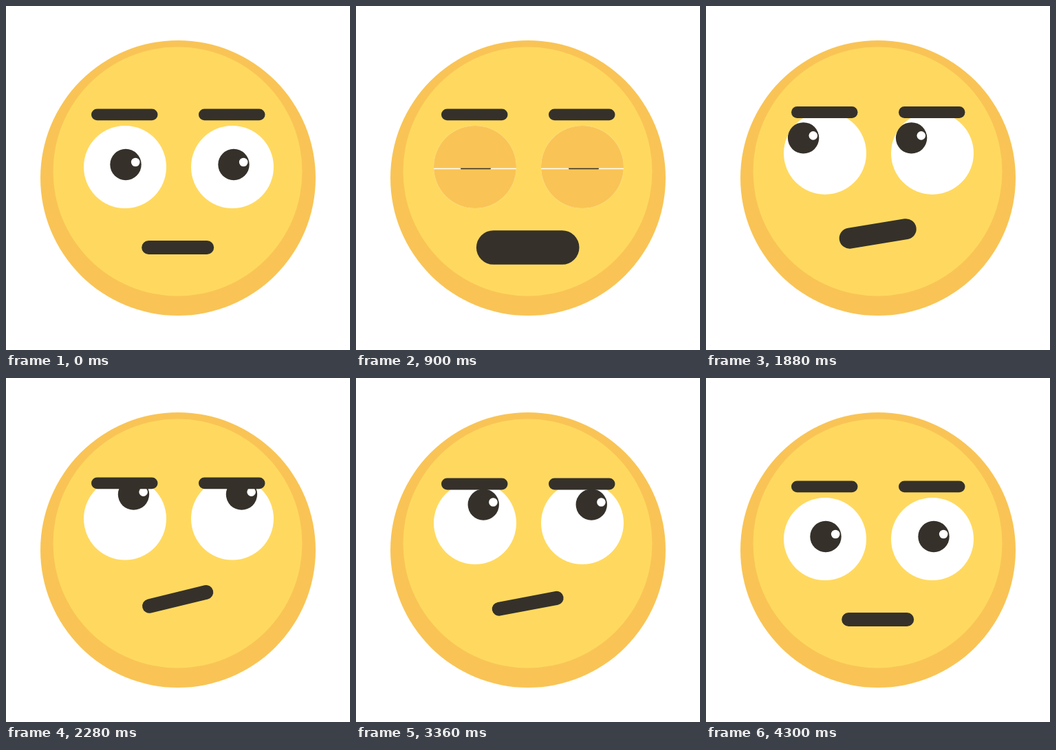
An HTML page that plays this animation: 500 by 500 pixels, repeating every 4.32 s.

```html
<!DOCTYPE html>
<html lang="en">
<head>
<meta charset="utf-8">
<title>Eye roll</title>
<style>
  html, body { margin: 0; width: 100%; height: 100%; overflow: hidden; background: #fff; }
  svg { display: block; width: 100vw; height: 100vh; }
  .rim { fill: #f9c455; }
  .skin { fill: #ffd95f; }
  .dark { fill: #35312a; }
  .white { fill: #fff; }
</style>
</head>
<body>
<svg viewBox="0 0 500 500">
  <defs>
    <clipPath id="ball"><circle cx="173" cy="234" r="60"/></clipPath>
    <clipPath id="underBrow"><rect x="90" y="153" width="320" height="200"/></clipPath>
    <g id="eye">
      <circle class="white" cx="173" cy="234" r="60"/>
    </g>
    <g id="pupil">
      <circle class="dark" cx="174" cy="230.5" r="22.7"/>
      <circle class="white" cx="188.2" cy="227" r="6.3"/>
    </g>
    <g id="lids" class="rim" clip-path="url(#ball)">
      <rect id="upper" x="105" y="170" width="136" height="0"/>
      <rect id="lower" x="105" y="298" width="136" height="0"/>
    </g>
    <rect id="brow" class="dark" x="124" y="149.5" width="96.5" height="16.8" rx="8.4"/>
  </defs>
  <circle class="rim" cx="250" cy="250" r="200"/>
  <circle class="skin" cx="249.5" cy="240.5" r="181"/>
  <g clip-path="url(#underBrow)">
    <g id="eyes">
      <use href="#eye"/>
      <use href="#eye" x="156"/>
      <g id="pupils">
        <use href="#pupil"/>
        <use href="#pupil" x="157"/>
      </g>
      <use href="#lids"/>
      <use href="#lids" x="156"/>
    </g>
  </g>
  <g id="brows">
    <use href="#brow"/>
    <use href="#brow" x="156"/>
  </g>
  <rect id="mouth" class="dark"/>
</svg>
<script>
const LOOP = 4320;
const $ = id => document.getElementById(id);
const [eyes, pupils, brows, mouth, upper, lower] =
  ['eyes', 'pupils', 'brows', 'mouth', 'upper', 'lower'].map($);

// Cubic bezier (.68, 0, .18, 1), solved by bisection.
function ease(x) {
  if (x <= 0) return 0;
  if (x >= 1) return 1;
  let lo = 0, hi = 1;
  for (let i = 0; i < 24; i++) {
    const s = (lo + hi) / 2, r = 1 - s;
    if (2.04 * s * r * r + 0.54 * s * s * r + s ** 3 < x) lo = s; else hi = s;
  }
  return lo * lo * (3 - 2 * lo);
}

// Eased value through [time, value] steps.
function track(t, steps) {
  let [t0, v0] = steps[0];
  for (const [t1, v1] of steps) {
    if (t < t1) return v0 + (v1 - v0) * ease((t - t0) / (t1 - t0));
    [t0, v0] = [t1, v1];
  }
  return v0;
}

const lift = [[0, 0], [1236, 0], [2540, 1], [2800, 1], [LOOP, 0]];
const blink = [[0, 0], [855, 1], [1236, 0]];
const thickness = [[0, 20], [1030, 50], [1236, 50], [2540, 20]];
const width = [[0, 105], [1030, 150], [1236, 150], [2346, 105.5], [2800, 105.5], [LOOP, 105]];

// Path of the gaze while the eyes roll: time, x, y.
const LOOK = [14.7, -30.5];
const roll = [
  [1080, 0, 0], [1340, -8, 5.5], [1510, -26, 8.5], [1690, -41, -1],
  [1880, -32.5, -18.5], [2020, -11, -29], [2180, 7.5, -32], [2540, ...LOOK]
];

// Smooth curve through the roll points, at rest at both ends.
function rollAt(t, axis) {
  let i = 0;
  while (i < roll.length - 2 && t >= roll[i + 1][0]) i++;
  const a = roll[i], b = roll[i + 1], span = b[0] - a[0];
  const slope = k => k === 0 || k === roll.length - 1 ? 0 :
    (roll[k + 1][axis] - roll[k - 1][axis]) / (roll[k + 1][0] - roll[k - 1][0]);
  const u = (t - a[0]) / span, r = 1 - u;
  return a[axis] * (1 + 2 * u) * r * r + b[axis] * u * u * (3 - 2 * u)
    + span * u * r * (slope(i) * r - slope(i + 1) * u);
}

function gaze(t, up) {
  if (t <= 1080) return [0, 0];
  if (t < 2540) return [rollAt(t, 1), rollAt(t, 2)];
  return LOOK.map(v => v * up);
}

function set(el, attrs) {
  for (const k in attrs) el.setAttribute(k, attrs[k]);
}

function draw(t) {
  const up = track(t, lift), shut = track(t, blink);
  const h = track(t, thickness), w = track(t, width);
  set(eyes, { transform: `translate(0 ${-30.3 * up})` });
  set(brows, { transform: `translate(0 ${-5.1 * up})` });
  set(pupils, { transform: `translate(${gaze(t, up).join(' ')})` });
  set(upper, { height: 4 + 62.5 * shut });
  set(lower, { y: 294 - 57.5 * shut, height: 4 + 57.5 * shut });
  set(mouth, {
    x: -w / 2, y: -h / 2, width: w, height: h, rx: h / 2,
    transform: `translate(249.7 ${351 - 30.3 * up}) rotate(${-14 * up})`
  });
}

const start = performance.now();
function tick() {
  draw((performance.now() - start) % LOOP);
  requestAnimationFrame(tick);
}
tick();
</script>
</body>
</html>
```
